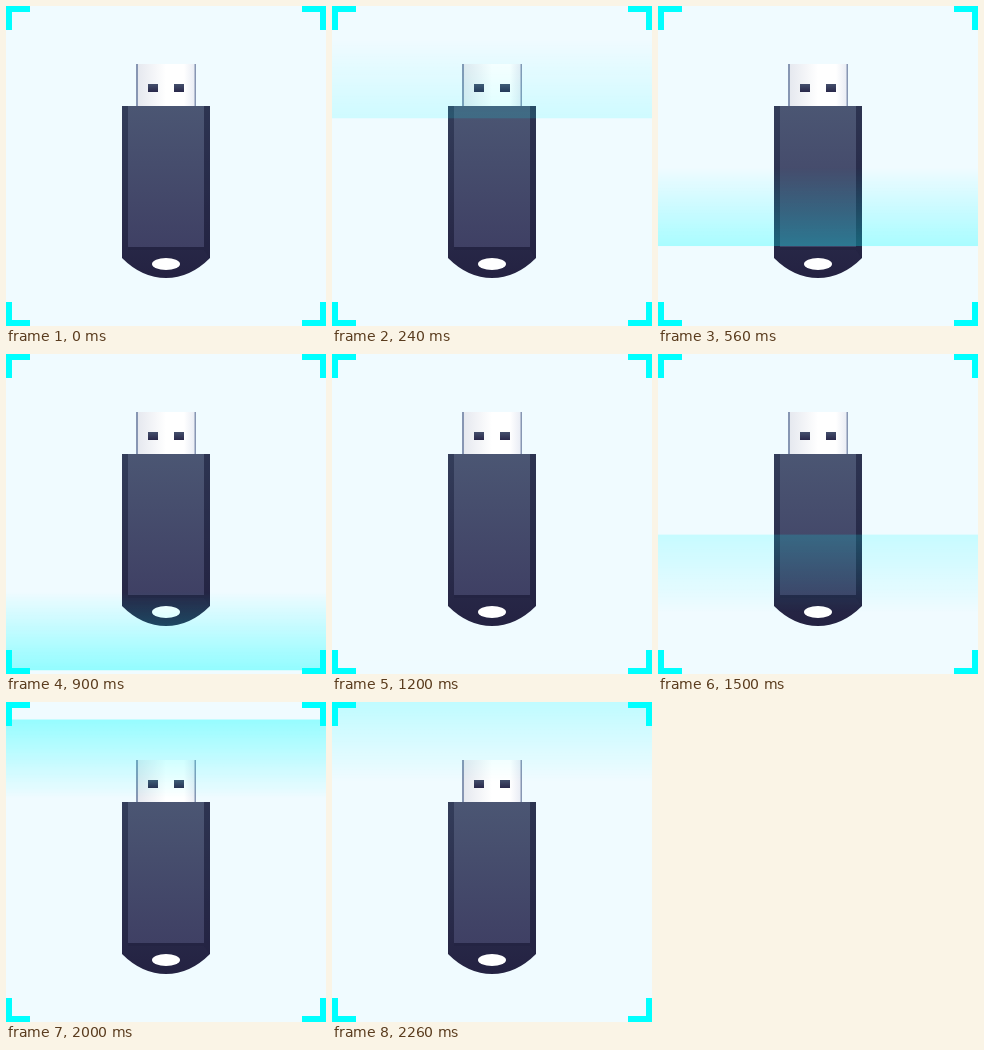
Recreate the animation shown at these times as an HTML page. Size 320 by 320 pixels, loop 2.32 s.

```html
<!DOCTYPE html>
<html lang="en">
<head>
<meta charset="utf-8">
<title>USB drive scan</title>
<style>
  html, body { margin: 0; width: 100%; height: 100%; overflow: hidden; background: #f0fbff; }
  .stage { position: relative; width: 320px; height: 320px; overflow: hidden; }
  svg { position: absolute; inset: 0; display: block; }

  .beam {
    position: absolute;
    left: 0;
    top: -80px;
    width: 320px;
    height: 80px;
    background: linear-gradient(rgba(0, 255, 255, 0), rgba(0, 255, 255, .4));
    transform-origin: 50% 100%;
    opacity: 0;
    animation: scan 2320ms infinite;
  }

  /* Sweep down 960 ms, fade 240 ms, then the same upwards; the last fade is cut short. */
  @keyframes scan {
    0%, .862% { transform: translateY(0) scaleY(1); opacity: 0; animation-timing-function: ease-out; }
    42.241% { transform: translateY(320px) scaleY(1); opacity: 1; animation-timing-function: ease-out; }
    52.585% { transform: translateY(320px) scaleY(1); opacity: 0; animation-timing-function: step-end; }
    52.586% { transform: translateY(320px) scaleY(-1); opacity: 0; animation-timing-function: ease-out; }
    93.966% { transform: translateY(0) scaleY(-1); opacity: 1; animation-timing-function: cubic-bezier(0, 0, .4715, .6162); }
    100% { transform: translateY(0) scaleY(-1); opacity: .2305; }
  }
</style>
</head>
<body>
<div class="stage">
  <svg width="320" height="320" viewBox="0 0 320 320">
    <defs>
      <linearGradient id="metal">
        <stop offset="0" stop-color="#e4e7ee"/>
        <stop offset=".5" stop-color="#fff"/>
        <stop offset=".8" stop-color="#fff"/>
        <stop offset="1" stop-color="#e6eaf3"/>
      </linearGradient>
      <linearGradient id="slot" x2="0" y2="1">
        <stop offset="0" stop-color="#444f6c"/>
        <stop offset="1" stop-color="#29284a"/>
      </linearGradient>
      <linearGradient id="shell" x2="0" y2="1">
        <stop offset="0" stop-color="#333d5a"/>
        <stop offset="1" stop-color="#242242"/>
      </linearGradient>
      <linearGradient id="panel" x2="0" y2="1">
        <stop offset="0" stop-color="#4b5673"/>
        <stop offset="1" stop-color="#3f4064"/>
      </linearGradient>
    </defs>

    <!-- connector -->
    <path fill="url(#metal)" d="M130 58h60v42h-60z"/>
    <path fill="#8796b3" d="M130 58h2v42h-2zM188.500 58h1.500v42h-1.500z"/>
    <path fill="url(#slot)" d="M142 78h10v8h-10zM168 78h10v8h-10z"/>

    <!-- body -->
    <path fill="url(#shell)" d="M116 100h88v152Q184 272 160 272Q136 272 116 252z"/>
    <path fill="#1f1e3c" fill-opacity=".3" d="M198 100h6v152l-6 -8z"/>
    <path fill="#1f1e3c" fill-opacity=".3" d="M122 241h76v3h-76z"/>
    <path fill="url(#panel)" d="M122 100h76v141h-76z"/>
    <ellipse cx="160" cy="258" rx="14" ry="6" fill="#fff"/>

    <!-- corner brackets -->
    <path fill="none" stroke="#0ff" stroke-width="6"
      d="M24 3H3V24M296 3H317V24M24 317H3V296M296 317H317V296"/>
  </svg>
  <div class="beam"></div>
</div>
</body>
</html>
```
